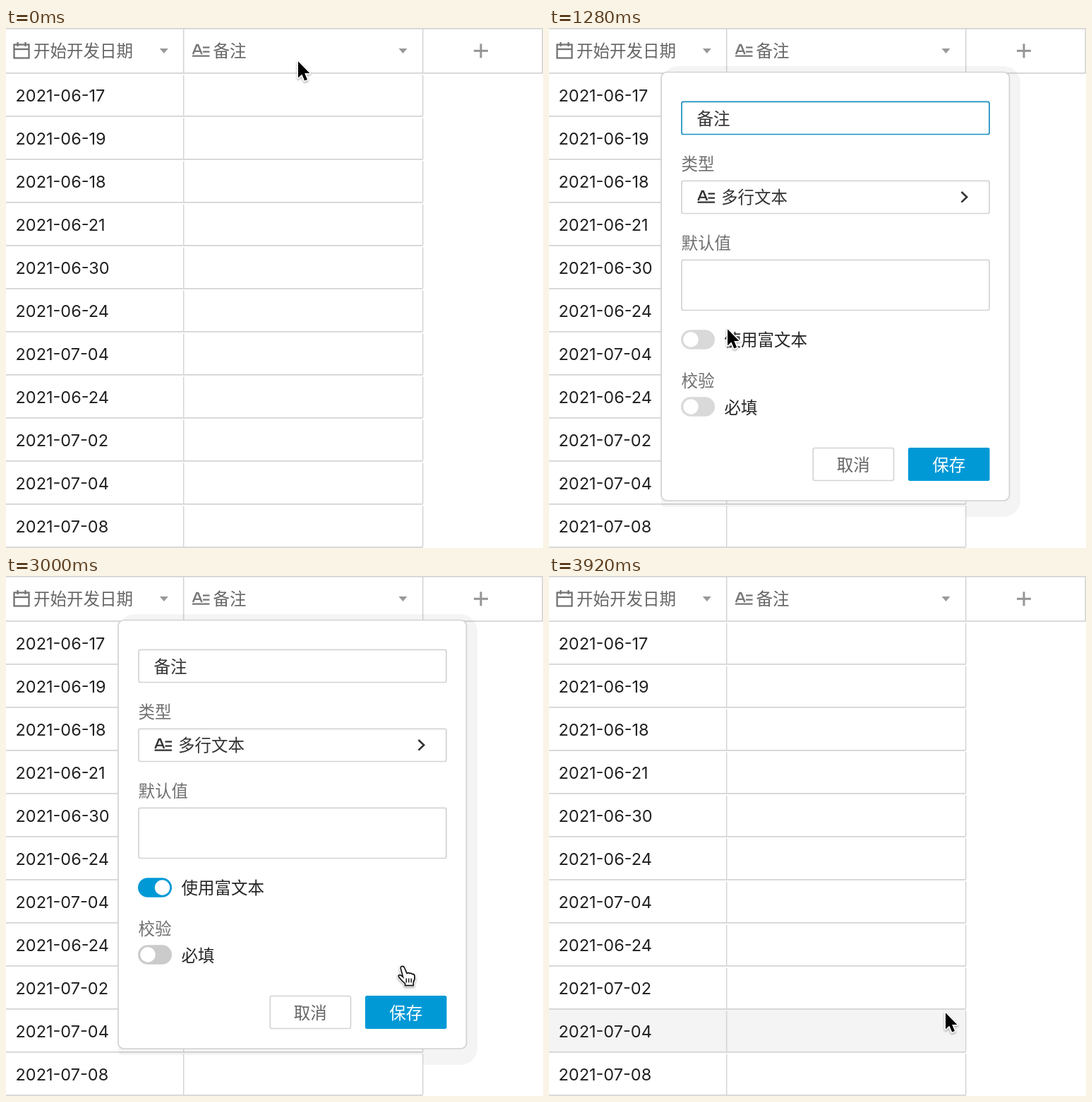
An HTML page with a canvas for the animation above (4.08 s loop, 761x736 px).

```html
<!DOCTYPE html>
<html lang="zh-CN">
<head>
<meta charset="utf-8">
<title>多行文本字段设置</title>
<style>
html, body { margin: 0; width: 100%; height: 100%; overflow: hidden; background: #fff; }
canvas { display: block; }
</style>
</head>
<body>
<canvas id="stage" width="761" height="736" lang="zh-CN"></canvas>
<script>
const ctx = document.getElementById('stage').getContext('2d');
const LOOP = 4080, STEP = 40;
const CJK = '23.5px "Noto Sans CJK SC", "Noto Sans CJK", sans-serif';
const LATIN = '23.5px Inter, sans-serif';
const LINE = '#d4d4d4', BLUE = [0, 153, 214], BLUE_HOVER = [0, 136, 191];
const GREY = [217, 217, 217], GREY_HOVER = [203, 203, 203];
const DATES = ['06-17', '06-19', '06-18', '06-21', '06-30', '06-24',
  '07-04', '06-24', '07-02', '07-04', '07-08'];

// Pointer path: time, x, y, easing used to reach the point
const smooth = p => p * p * (3 - 2 * p);
const easeOut = p => 1 - (1 - p) ** 2.5;
const PATH = [
  [0, 413, 46, smooth], [930, 413, 46, smooth], [1360, 236, 463, smooth],
  [1640, 225, 470, easeOut], [1680, 225, 470, smooth], [1920, 222, 451, smooth],
  [2800, 222, 451, smooth], [3000, 560.5, 552, smooth], [3360, 560, 613, easeOut],
  [3880, 560, 613, smooth], [3920, 561, 617, smooth], [LOOP, 561, 617, smooth]
];

const clamp = v => Math.max(0, Math.min(1, v));
const ramp = (t, a, b) => clamp((t - a) / (b - a));
const mix = (a, b, p) => a.map((v, i) => v + (b[i] - v) * p);
const rgb = c => `rgb(${c.map(Math.round).join(',')})`;

function pointerAt(t) {
  const i = PATH.findIndex((k, n) => n && t <= k[0]);
  const [t0, x0, y0] = PATH[i - 1], [t1, x1, y1, ease] = PATH[i];
  const p = ease(ramp(t, t0, t1));
  return [x0 + (x1 - x0) * p, y0 + (y1 - y0) * p];
}

function text(str, x, y, color, font = CJK, align = 'left') {
  ctx.font = font;
  ctx.textAlign = align;
  ctx.fillStyle = color;
  ctx.fillText(str, x, y);
}

function line(color, width, ...points) {
  ctx.strokeStyle = color;
  ctx.lineWidth = width;
  ctx.beginPath();
  points.forEach(([x, y], i) => i ? ctx.lineTo(x, y) : ctx.moveTo(x, y));
  ctx.stroke();
}

function box(x, y, w, h, r, fill, stroke) {
  ctx.beginPath();
  ctx.roundRect(x, y, w, h, r);
  if (fill) { ctx.fillStyle = fill; ctx.fill(); }
  if (stroke) { ctx.strokeStyle = stroke; ctx.lineWidth = 1.7; ctx.stroke(); }
}

function circle(x, y, r, fill) {
  ctx.beginPath();
  ctx.arc(x, y, r, 0, Math.PI * 2);
  ctx.fillStyle = fill;
  ctx.fill();
}

function at(x, y, draw) {
  ctx.save();
  ctx.translate(x, y);
  draw();
  ctx.restore();
}

function textIcon(x, y, color) {
  at(x, y, () => {
    line(color, 2.5, [1, 5], [6.3, -8], [8.2, -8], [13.5, 5]);
    line(color, 2.2, [3, 0.8], [11.5, 0.8]);
    line(color, 2.3, [15, -4.5], [24.5, -4.5]);
    line(color, 2.3, [15, 1.6], [24.5, 1.6]);
    line(color, 2.3, [0, 7.6], [24.5, 7.6]);
  });
}

function calendarIcon() {
  ctx.strokeStyle = '#737373';
  ctx.lineWidth = 2.3;
  ctx.strokeRect(11.5, 23.5, 21, 19);
  line('#737373', 2.3, [11.5, 30], [32.5, 30]);
  line('#737373', 2.3, [16.5, 20], [16.5, 26]);
  line('#737373', 2.3, [27.5, 20], [27.5, 26]);
}

function dropArrow(x) {
  ctx.fillStyle = '#999';
  ctx.beginPath();
  ctx.moveTo(x - 6, 29);
  ctx.lineTo(x + 6, 29);
  ctx.lineTo(x, 36);
  ctx.fill();
}

function table(hoverRow) {
  if (hoverRow >= 0) {
    ctx.fillStyle = '#f4f4f4';
    ctx.fillRect(0, 64 + hoverRow * 61, 591, 61);
  }
  line(LINE, 1.7, [0, 0.8], [761, 0.8]);
  line(LINE, 1.7, [0, 63.8], [761, 63.8]);
  for (const x of [251.7, 590.7, 760.2]) line(LINE, 1.6, [x, 0], [x, 64]);
  calendarIcon();
  text('开始开发日期', 39, 41, '#666');
  dropArrow(223.8);
  textIcon(264, 32, '#777');
  text('备注', 293.5, 41, '#666');
  dropArrow(562.5);
  line('#959595', 3, [663, 32.3], [683, 32.3]);
  line('#959595', 3, [673, 22.3], [673, 42.3]);

  DATES.forEach((date, i) => {
    const y = 64 + i * 61;
    for (const x of [251.7, 590.7]) line(LINE, 1.5, [x, y + 2.5], [x, y + 60]);
    line(LINE, 1.7, [0, y + 60.8], [591, y + 60.8]);
    text('2021-' + date, 13.5, y + 40, '#202020', LATIN);
  });
}

function shadow() {
  ctx.save();
  ctx.beginPath();
  ctx.rect(159, 50, 432, 628);
  ctx.rect(591, 50, 170, 686);
  ctx.clip();
  box(159, 54, 509, 638, 24, 'rgba(0,0,0,.043)');
  ctx.restore();
}

function toggle(y, on, color) {
  box(187, y - 13.8, 48, 27.6, 13.8, rgb(color));
  circle(201 + 20.5 * on, y, 10.7, '#fff');
}

function spinner(t) {
  const a = -1.25 + (t - 3640) / 1000 * Math.PI * 2;
  ctx.lineWidth = 4;
  ctx.strokeStyle = '#a2d3e8';
  ctx.beginPath();
  ctx.arc(567, 617, 14.5, 0, Math.PI * 2);
  ctx.stroke();
  ctx.strokeStyle = '#fff';
  ctx.beginPath();
  ctx.arc(567, 617, 14.5, a, a + 1.85);
  ctx.stroke();
}

function saveButton(t) {
  const loading = t >= 3640;
  const color = mix(BLUE, BLUE_HOVER, ramp(t, 3040, 3240));
  box(509, 594, 115.5, 47, 2.5, loading ? '#b2dff2' : rgb(color));
  if (loading) spinner(t);
  else text('保存', 566.8, 626.5, '#fff', CJK, 'center');
}

function dialog(t) {
  const on = smooth(ramp(t, 2160, 2360));
  const hover1 = ramp(t, 1560, 1680) * (1 - ramp(t, 2800, 2960));
  const hover2 = ramp(t, 2920, 3000) * (1 - ramp(t, 3040, 3200));
  const caret = t < 840 || (t >= 1360 && t < 1880);

  shadow();
  box(159, 62.5, 493.5, 606.5, 8, '#fff', '#d2d2d2');

  box(188, 104.3, 436, 46.2, 2.5, null, rgb(mix([24, 144, 190], [212, 212, 212], on)));
  text('备注', 209.5, 136.5, '#333');
  if (caret) line('#222', 1.7, [258.5, 112], [258.5, 141.5]);

  text('类型', 187.5, 201, '#707070');
  box(188, 216.3, 436, 46.2, 2.5, null, LINE);
  textIcon(210.5, 239, '#333');
  text('多行文本', 244, 248, '#333');
  line('#333', 2.6, [584.5, 232], [592.2, 239.3], [584.5, 246.6]);

  text('默认值', 187.5, 313, '#707070');
  box(188, 328.3, 436, 71.2, 2.5, null, LINE);

  const off = mix(GREY, GREY_HOVER, hover1);
  toggle(441, on, mix(off, mix(BLUE, BLUE_HOVER, hover1), on));
  text('使用富文本', 248.5, 450, '#262626');

  text('校验', 187.5, 507.5, '#707070');
  toggle(536, 0, mix(GREY, GREY_HOVER, hover2));
  text('必填', 248.5, 545.5, '#262626');

  box(374.3, 594.5, 114.2, 46, 2.5, '#fff', LINE);
  text('取消', 431.3, 626.5, '#666', CJK, 'center');
  saveButton(t);
}

const ARROW = new Path2D('M0 0V23.2L5.3 18.2L9.2 27.3L13 25.7L9.2 16.8H16.4Z');
const HAND = new Path2D('M-1.3 3Q-1 -.3 2 .4Q3.6 .9 4.4 3L7.6 10.4Q9.6 8.8 11.4 10.4' +
  'Q13.5 9.4 15 11.5Q18 11 18.6 14Q19.3 19 16.8 23V27.6H5V24.6Q1 22 -2.2 17.6' +
  'Q-5.4 14.3 -3.8 13Q-1.8 11.7 2 15.4Z');

function outlined(path, fill, stroke, width) {
  ctx.save();
  ctx.shadowColor = 'rgba(0,0,0,.35)';
  ctx.shadowBlur = 3;
  ctx.shadowOffsetY = 1.5;
  ctx.strokeStyle = '#fff';
  ctx.lineWidth = width;
  ctx.lineJoin = 'round';
  ctx.stroke(path);
  ctx.restore();
  ctx.fillStyle = fill;
  ctx.fill(path);
  if (stroke) {
    ctx.strokeStyle = stroke;
    ctx.lineWidth = 1.7;
    ctx.stroke(path);
  }
}

function noEntry() {
  const ring = (color, width) => {
    ctx.strokeStyle = color;
    ctx.lineWidth = width;
    ctx.beginPath();
    ctx.arc(16, 39, 12.5, 0, Math.PI * 2);
    ctx.moveTo(7.5, 30.5);
    ctx.lineTo(24.5, 47.5);
    ctx.stroke();
  };
  circle(16, 39, 12.5, '#f0f0f0');
  ring('#fff', 6.5);
  ring('#999', 3.6);
}

function pointer(t) {
  const [x, y] = pointerAt(t);
  const hand = (t > 1760 && t < 3640);
  at(x, y, () => {
    if (hand) {
      outlined(HAND, '#fff', '#111', 4);
      for (const fx of [6.8, 10.3, 13.8]) line('#111', 1.4, [fx, 17.5], [fx, 23.5]);
      return;
    }
    if (t >= 3640 && t < 3880) noEntry();
    at(1, 1.2, () => outlined(ARROW, '#000', null, 3.4));
  });
}

function draw(t) {
  ctx.fillStyle = '#fff';
  ctx.fillRect(0, 0, 761, 736);
  table(t >= 3920 ? 9 : -1);
  if (t >= 400 && t < 3880) dialog(t);
  pointer(t);
}

function tick() {
  const t = performance.now() % LOOP;
  draw(Math.floor(t / STEP) * STEP);
  requestAnimationFrame(tick);
}
tick();
</script>
</body>
</html>
```
